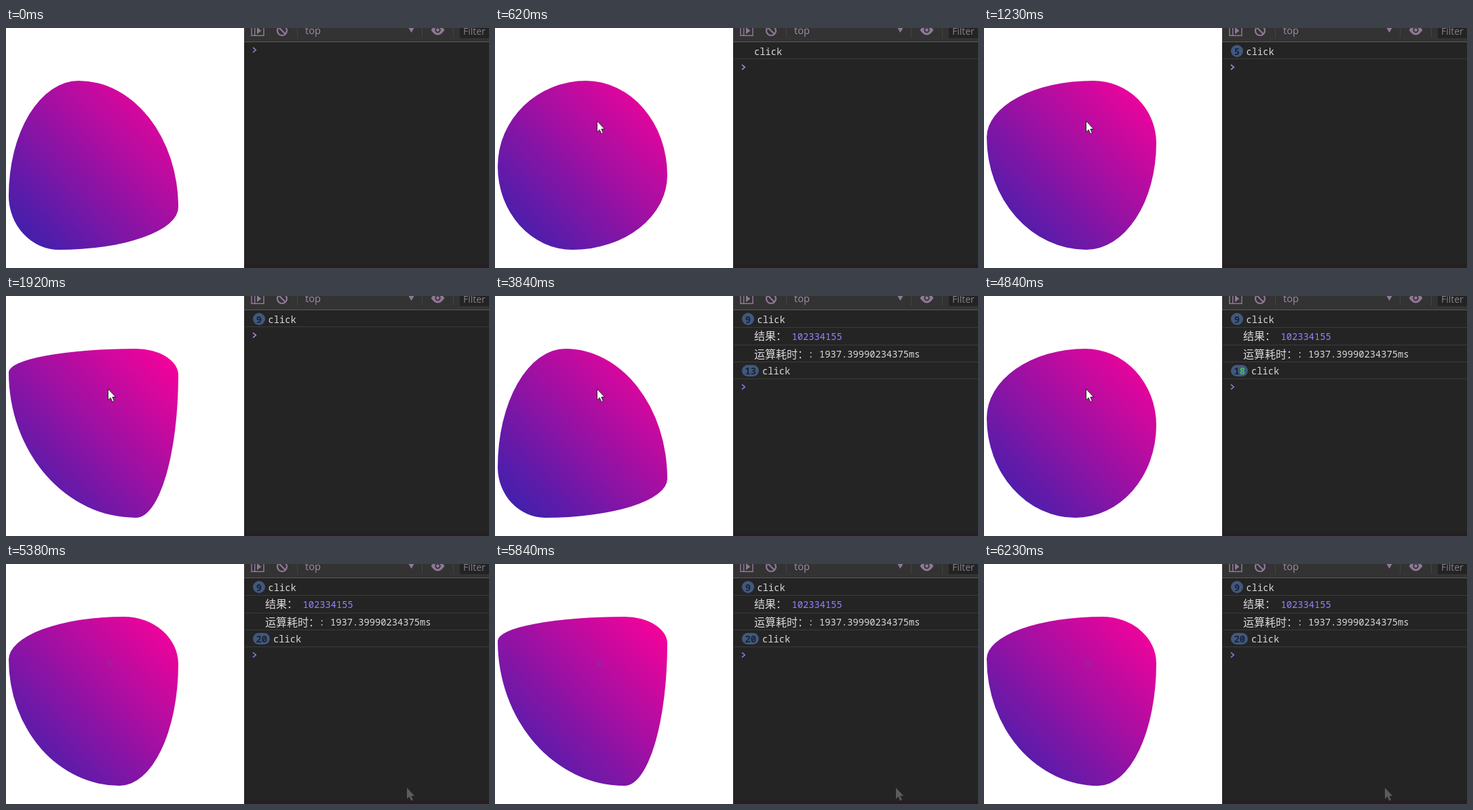
Animation, 712 px wide and 355 px high, one loop 6.3 s. Source, as an HTML page:

```html
<!DOCTYPE html>
<html lang="zh-CN">
<head>
<meta charset="utf-8">
<title>Blocked main thread</title>
<style>
  html, body { margin: 0; width: 100%; height: 100%; overflow: hidden; background: #fff; }
  svg { display: block; width: 712px; height: 355px; }
  text { white-space: pre; }
  .mono { font: 500 13.75px "Noto Sans Mono", "DejaVu Sans Mono", monospace; fill: #dcd8de; }
  .cjk { font: 400 16px "Noto Sans CJK SC", "Noto Sans CJK", sans-serif; fill: #dcd8de; }
  .ui { font-family: "Open Sans", "Noto Sans", sans-serif; fill: #a08cab; }
  .badge { font-weight: 600; fill: #1b2433; }
  .rule { stroke: #3b3b3b; }
  .icon { fill: none; stroke: #8f7896; }
  .solid { fill: #8f7896; }
</style>
</head>
<body>
<svg viewBox="0 0 712 355">
  <defs>
    <linearGradient id="fade" gradientUnits="userSpaceOnUse" x1="4" y1="328" x2="254" y2="78">
      <stop offset="0" stop-color="#3023ae"/>
      <stop offset="1" stop-color="#ff0099"/>
    </linearGradient>
    <path id="arrow" d="M0 0V16.4L3.7 13L6.3 19L8.9 17.9L6.4 12H11.2Z"/>
  </defs>
  <rect width="712" height="355" fill="#fff"/>
  <path id="blob" fill="url(#fade)"/>

  <rect x="351" width="361" height="355" fill="#242424"/>
  <rect x="351" width="361" height="20" fill="#333"/>
  <rect x="669" width="43" height="15" fill="#232323"/>
  <path d="M351 20.5H712" stroke="#5a5a5a"/>
  <rect x="351" y="350" width="361" height="5" fill="#281e21"/>
  <path d="M429.5 0V14M613.5 0V14M659.5 0V14" stroke="#434343"/>
  <path class="icon" stroke-width="1.5" d="M362 -2V11.3H380V-2M366.7 -2V11"/>
  <path class="solid" d="M370 -1L376.500 4L370 9Z"/>
  <g class="icon" stroke-width="2.2">
    <circle cx="407" cy="4" r="7"/>
    <path d="M402 -1L412 9"/>
  </g>
  <text class="ui" x="441" y="9" font-size="14.7">top</text>
  <path class="solid" d="M593 -1H602L597.500 7Z"/>
  <path class="solid" d="M626.500 3Q636.500 -11 646.500 3Q636.500 18 626.500 3Z"/>
  <circle cx="636.5" cy="3" r="4.2" fill="#333"/>
  <circle class="solid" cx="636.5" cy="3" r="2.4"/>
  <text class="ui" x="674" y="10" font-size="14" style="fill:#85808a">Filter</text>

  <g id="first">
    <rect id="firstBadge" x="364" y="25" width="18" height="18" rx="9" fill="#41587f"/>
    <text id="firstCount" class="mono badge" x="373" y="39.500" text-anchor="middle"></text>
    <text id="firstText" class="mono" y="40">click</text>
    <path id="firstRule" class="rule"/>
  </g>
  <g id="results">
    <text class="cjk" x="382" y="65">结果：</text>
    <text class="mono" x="437.5" y="65" style="fill:#9980ff">102334155</text>
    <text class="cjk" x="382" y="91.500">运算耗时：</text>
    <text class="mono" x="461.5" y="91">: 1937.39990234375ms</text>
    <path class="rule" d="M352 72.500H712M352 97.500H712M352 122.500H712"/>
    <rect x="364" y="102" width="25" height="17" rx="8.5" fill="#41587f"/>
    <text class="mono badge" x="368.5" y="116"><tspan id="tens"></tspan><tspan id="ones"></tspan></text>
    <text class="mono" x="394" y="116">click</text>
  </g>
  <path id="prompt" d="M-2.500 -3.700L1.800 0L-2.500 3.700" fill="none" stroke-width="1.6"/>

  <g id="ghosts">
    <use href="#arrow" x="149.500" y="137.500" fill="#7a3f9c" opacity=".25"/>
    <use href="#arrow" x="591" y="331" fill="#5c5c5c"/>
  </g>
  <use id="cursor" href="#arrow" fill="#fff" stroke="#222" stroke-width="1"/>
</svg>
<script>
  const LOOP = 6300, FREEZE = 1920, RESUME = 3840, PEAK = 5815;
  const CLICK_GAP = 172, FIRST_CLICK = 480;
  const $ = id => document.getElementById(id);
  const mix = (a, b, p) => a + (b - a) * p;
  const show = (id, on) => $(id).setAttribute("visibility", on ? "visible" : "hidden");
  const place = (id, x, y) => $(id).setAttribute("transform", `translate(${x} ${y})`);

  function snap(t) {
    if (t >= RESUME) return RESUME + Math.floor((t - RESUME + 3) / 77.1) * 77.1;
    return Math.min(FREEZE, Math.floor((t + 3) / 76.8) * 76.8);
  }

  function morph(t) {
    if (t < RESUME) return mix(0.035, 1, t / FREEZE);
    return 1.02 - Math.abs(t - PEAK) * 1.02 / (PEAK - RESUME);
  }

  // Rounded square whose four tangent points slide along its sides.
  function blobPath(p) {
    const x = 4, y = 78, size = 250;
    const top = size * mix(0.40, 0.75, p), bottom = size * mix(0.28, 0.75, p);
    const left = size * mix(0.70, 0.14, p), right = size * mix(0.77, 0.156, p);
    const arc = (rx, ry, ex, ey) => `A${rx} ${ry} 0 0 1 ${x + ex} ${y + ey}`;
    return `M${x} ${y + left}` + arc(top, left, top, 0)
      + arc(size - top, right, size, right)
      + arc(size - bottom, size - right, bottom, size)
      + arc(bottom, size - left, 0, left) + "Z";
  }

  function drawConsole(t) {
    const done = t >= RESUME;
    const clicks = Math.max(0, Math.min(9, Math.floor((t - FIRST_CLICK) / CLICK_GAP) + 1));
    const many = clicks > 1;
    $("first").style.display = clicks ? "" : "none";
    show("firstBadge", many);
    $("firstCount").textContent = many ? clicks : "";
    $("firstText").setAttribute("x", many ? 386.5 : 382);
    $("firstRule").setAttribute("d", `M352 ${done ? 46.5 : 45.5}H712`);

    $("results").style.display = done ? "" : "none";
    if (done) {
      const more = Math.min(20, 13 + Math.floor((t - RESUME) / CLICK_GAP));
      $("tens").textContent = Math.floor(more / 10);
      $("ones").textContent = more % 10;
      $("ones").style.fill = more > 13 && more < 20 ? "#3fc64a" : "";
    }
    place("prompt", 366.5, done ? 134.5 : clicks ? 58 : 32.5);
    $("prompt").setAttribute("stroke", done ? "#7f7fe6" : clicks ? "#b18ad2" : "#8a80c8");
  }

  function drawCursor(t) {
    const enter = Math.min(1, Math.max(0, (t - 70) / 350));
    const near = 1 - (1 - enter) ** 2;
    const leave = Math.max(0, (t - 5228) / 77);
    const x = mix(mix(712, 150.5, near), 590.5, leave);
    const y = mix(mix(150, 137.5, near), 331, leave);
    place("cursor", x, y);
    show("cursor", t > 70 && leave < 1.5);
    show("ghosts", leave >= 1.5);
  }

  function draw(time) {
    const t = snap(time);
    $("blob").setAttribute("d", blobPath(morph(t)));
    drawConsole(t);
    drawCursor(t);
  }

  const start = performance.now();
  function tick() {
    draw((performance.now() - start) % LOOP);
    requestAnimationFrame(tick);
  }
  tick();
</script>
</body>
</html>
```
